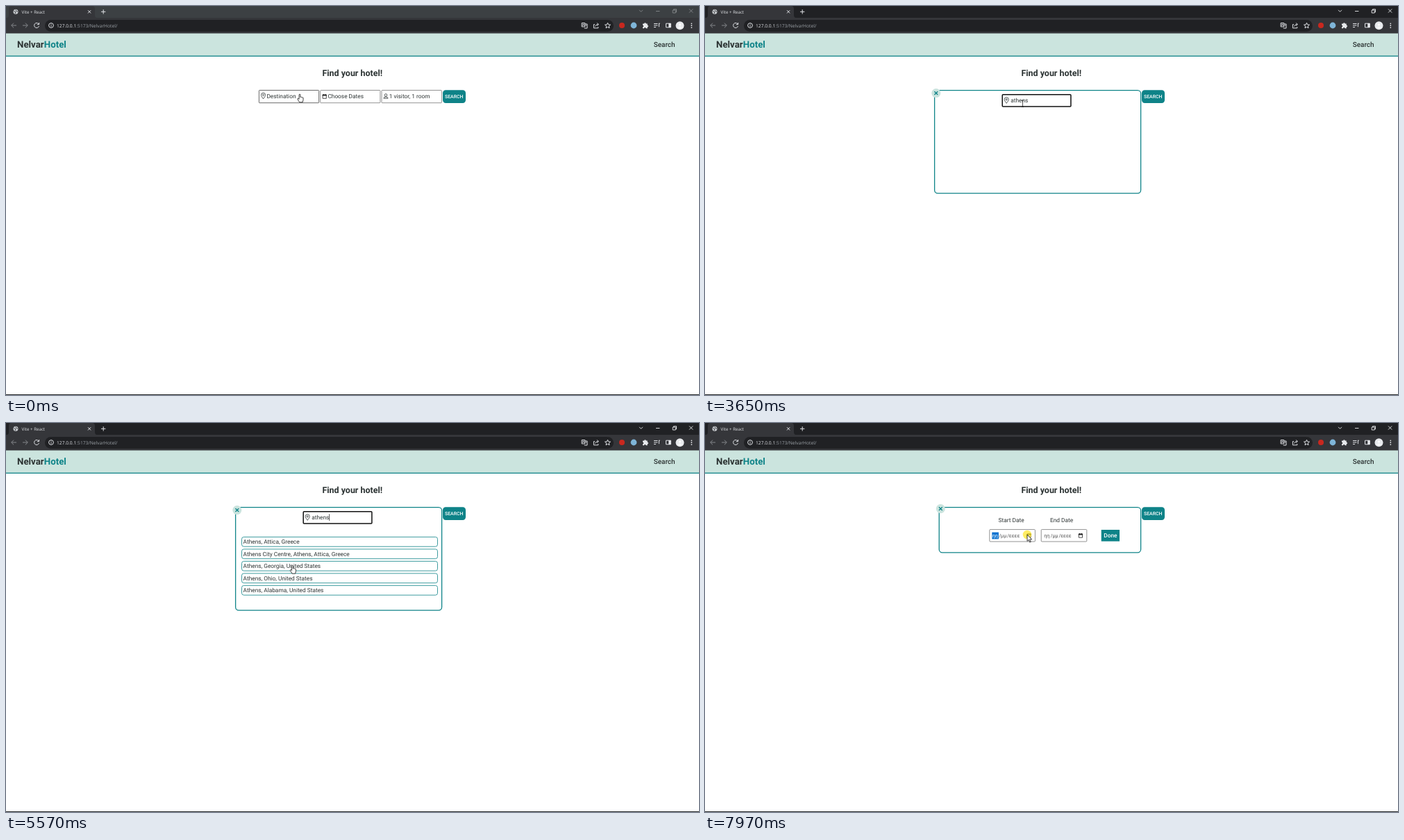
Recreate the animation shown at these times as an HTML page. Size 998 by 561 pixels, loop 8 s.

```html
<!DOCTYPE html>
<html lang="en">
<head>
<meta charset="utf-8">
<title>Hotel search</title>
<style>
  html, body { margin: 0; width: 100%; height: 100%; overflow: hidden; background: #fff; }
  svg { display: block; width: 100%; height: 100%; }
  text { font: 8.32px Roboto, sans-serif; fill: #2c3333; white-space: pre; text-rendering: geometricPrecision; }
  .ui { font-family: "Open Sans", sans-serif; fill: #dfe1e5; }
  .logo { font-size: 13.3px; font-weight: 700; }
  .title { font-size: 12.48px; font-weight: 700; }
  .nav { font-size: 9.98px; font-weight: 500; }
  .button { font-size: 6.93px; font-weight: 500; fill: #fff; }
  .done { font-weight: 500; fill: #fff; }
  .date { font-size: 7.2px; fill: #555; }
  .teal { fill: #0e8388; }
  .line { fill: none; stroke: #dfe1e5; stroke-width: 1; }
  .dim { stroke: #85888c; }
  .glyph { fill: none; stroke: #2c3333; stroke-width: .8; }
  .field { fill: #fff; stroke: #767676; stroke-width: .8; }
  .panel { fill: #fff; stroke: #0e8388; stroke-width: 1.3; }
  .option { fill: #fff; stroke: #0e8388; stroke-width: .8; }
  .cursor path { stroke: #111; stroke-width: .8; fill: #fff; stroke-linejoin: round; }
</style>
</head>
<body>
<svg viewBox="0 0 998 561" preserveAspectRatio="none">
  <defs>
    <clipPath id="fieldClip"><rect x="375" y="121" width="72" height="19"/></clipPath>
    <g id="pin"><path class="glyph" d="M0 4.3C-2 1.5-3.1.2-3.1-1.2a3.1 3.1 0 0 1 6.2 0C3.1.2 2 1.5 0 4.3Z"/><circle class="glyph" cy="-1.2" r="1.1"/></g>
    <g id="calendar"><path d="M-2.6-2.3h5.2v5.2h-5.2Z" fill="none" stroke="#222" stroke-width=".8"/><path d="M-3-2.6h6v1.8h-6ZM-2-3.4h.9v1h-.9ZM1.1-3.4H2v1h-.9Z" fill="#222"/></g>
    <g id="close"><circle r="6.5" fill="#cbe4de"/><path d="M-2.4-2.4 2.4 2.4M2.4-2.4-2.4 2.4" stroke="#0e8388" stroke-width="1.3"/></g>
  </defs>

  <!-- browser window -->
  <rect id="titleBar" width="998" height="18"/>
  <path d="M1 17Q4 17 4 13V4Q4 0 8 0H124Q128 0 128 4V13Q128 17 131 17Z" fill="#35363a"/>
  <rect y="17" width="998" height="23" fill="#35363a"/>
  <rect x="56" y="20" width="819" height="17" rx="8.5" fill="#202124"/>
  <circle cx="14" cy="8.3" r="3.5" fill="#c8cbcf"/>
  <path d="M11.4 7.2 14 8.6 13.2 11M14 5.4 15 7.4 17 8.2" fill="none" stroke="#45474a" stroke-width="1"/>
  <text class="ui" x="22.5" y="10.5" style="font-size:6.2px">Vite + React</text>
  <path class="line" d="M118 6.2l4.2 4.2m0-4.2-4.2 4.2M137 8.3h6.4M140.2 5.1v6.4"/>
  <g id="controls" fill="none" stroke-width=".9"><path d="M912 5.8l2.5 2.5L917 5.8M936 7.5h5.4M960.2 6h4v4h-4ZM961.4 6V4.7h4.1v4.1h-1.2M984 4.4l5.2 5.2m0-5.2-5.2 5.2"/></g>

  <path class="line dim" d="M15 28H7.8m3.3-3.4L7.7 28l3.4 3.4M24 28h7.2m-3.3-3.4 3.4 3.4-3.4 3.4"/>
  <path class="line" d="M46.8 25.7A3.5 3.5 0 1 0 47.5 29M47.6 24v2.7h-2.8" stroke-width="1.2"/>
  <circle class="line" cx="65" cy="28" r="3.4" stroke-width=".8"/>
  <path class="line" d="M65 27.6v2.2M65 25.9v.9"/>
  <text class="ui" x="73" y="30.6" style="font-size:6.7px">127.0.0.1<tspan fill="#9aa0a6">:5173/NelvarHotel/</tspan></text>
  <g class="line" stroke-width=".9">
    <path d="M829.2 24.5h4.6v5.4h-4.6ZM834 26h3v6h-4.2M830.4 28.4l1.1-2.6 1.1 2.6M834.6 28h1.6"/>
    <path d="M848 26.6h-1.6v5.2h6.4V30M848.6 29.5q.5-3 4.3-3M851.2 24.4l2.1 2.1-2.1 2.1"/>
    <path d="M866.5 24.2l1.1 2.7 2.9.2-2.2 1.9.7 2.8-2.5-1.5-2.5 1.5.7-2.8-2.2-1.9 2.9-.2Z"/>
    <path d="M933 25.5h5.5M933 28h5.5M933 30.5h3M940.4 25v5.2M940 25.2h1.8"/>
    <path d="M950.5 25.2h6.8v5.6h-6.8Z"/>
  </g>
  <circle cx="887" cy="28" r="4" fill="#c9281f"/>
  <circle cx="904" cy="28" r="4.4" fill="#7fb5d8"/>
  <g fill="#e8eaed">
    <path d="M917 25.6h2.1a1.3 1.3 0 0 1 2.6 0h2v2.1a1.3 1.3 0 0 1 0 2.6v2h-2.2a1.2 1.2 0 0 0-2.4 0H917v-2.2a1.2 1.2 0 0 0 0-2.4Z"/>
    <path d="M954.3 25h3v6h-3Z"/>
    <circle cx="970.5" cy="28.3" r="6"/>
    <circle cx="987.3" cy="25.3" r=".9"/><circle cx="987.3" cy="28.2" r=".9"/><circle cx="987.3" cy="31.1" r=".9"/>
  </g>
  <path d="M967 31.5q3.5-3.4 7 0ZM968.9 27a1.6 1.6 0 1 1 3.2 0 1.6 1.6 0 1 1-3.2 0Z" fill="#fff"/>

  <!-- page -->
  <rect y="39.5" width="998" height="32.5" fill="#cbe4de"/>
  <rect y="71.6" width="998" height="1.3" fill="#0e8388"/>
  <text class="logo" x="16" y="60.3">Nelvar<tspan class="teal">Hotel</tspan></text>
  <text class="nav" x="932.7" y="59">Search</text>
  <text class="title" x="455.4" y="101.4">Find your hotel!</text>
  <rect class="teal" x="629" y="121.3" width="33" height="18.6" rx="4.2"/>
  <text class="button" x="632" y="133.4">SEARCH</text>
  <rect y="560" width="998" height="1" fill="#25282a"/>

  <g id="form">
    <rect id="destField" class="field" x="364.4" y="121.5" width="86.2" height="18.2" rx=".8"/>
    <rect id="datesField" class="field" x="452.7" y="121.5" width="86.2" height="18.2" rx=".8"/>
    <rect class="field" x="541" y="121.5" width="86.4" height="18.2" rx=".8"/>
    <use href="#pin" x="370.5" y="129.6"/>
    <text id="destination" x="375.4" y="133.3" clip-path="url(#fieldClip)"></text>
    <use href="#calendar" x="458.7" y="130.4"/>
    <text x="463.4" y="133.3">Choose Dates</text>
    <circle class="glyph" cx="547" cy="128.5" r="1.8"/>
    <path class="glyph" d="M543.9 133.2q0-2.2 3.1-2.2t3.1 2.2Z"/>
    <text x="551.8" y="133.3">1 visitor, 1 room</text>
  </g>

  <g id="destPanel">
    <rect class="panel" x="330.6" y="121.7" width="297" height="148.4" rx="4.6"/>
    <use href="#close" x="332.8" y="125.6"/>
    <rect id="input" x="428.2" y="127.7" width="98.7" height="17.2" rx="1" fill="#fff"/>
    <use href="#pin" x="434.2" y="136"/>
    <text id="typed" x="440.2" y="139"></text>
    <rect id="caret" y="131.3" width=".7" height="9.7" fill="#111"/>
    <g id="list"></g>
  </g>

  <g id="datePanel">
    <rect class="panel" x="337.2" y="121.7" width="290.4" height="65.2" rx="4.6"/>
    <use href="#close" x="339.3" y="123.6"/>
    <text x="422.6" y="143">Start Date</text>
    <text x="497" y="143">End Date</text>
    <g id="dates"></g>
    <rect class="teal" x="570.7" y="154" width="26.3" height="16.6"/>
    <text class="done" x="574.3" y="165">Done</text>
  </g>

  <g id="pointer" class="cursor">
    <circle id="press" r="6.3" fill="#ffe629" opacity=".72"/>
    <path id="arrow" d="M0 0V9.4L2.2 7.4 3.7 11 5.2 10.4 3.7 6.9H6.7Z"/>
    <path id="hand" d="M-.9 6V.6Q-.9-.3 0-.3T.9.6V4Q1.7 3.3 2.3 4.1 3.1 3.5 3.7 4.4 5 4 5 5.4V8L4.2 11.3H-.4L-2.7 7.6Q-3.5 6.2-2.6 5.7-1.8 5.4-.9 6.8Z"/>
    <path id="beam" d="M-1.5-4.6H-.5L0-4.2.5-4.6H1.5M0-4.2V4.2M-1.5 4.6H-.5L0 4.2.5 4.6H1.5" style="fill:none;stroke-width:.7"/>
  </g>
</svg>
<script>
const LOOP = 8000, BLINK = 545;
const el = Object.fromEntries([...document.querySelectorAll('[id]')].map(e => [e.id, e]));
const show = (node, on) => node.setAttribute('visibility', on ? 'visible' : 'hidden');
const within = (t, a, b) => t >= a && t < b;

// time, x, y of the hot spot, shape until the next row
const PATH = [
  [0, 423, 127.5, 'hand'], [920, 423, 128, 'arrow'], [1250, 423, 128, 'arrow'],
  [1380, 438, 135, 'beam'], [1600, 457.5, 141, 'beam'], [3780, 457.5, 141, 'beam'],
  [3900, 450, 150, 'arrow'], [4010, 443, 165, 'hand'], [4410, 420, 239, 'hand'],
  [4450, 420, 239, 'hand'], [4680, 394.5, 172, 'hand'], [4950, 394.5, 172, 'hand'],
  [5290, 420, 238, 'hand'], [5500, 416, 214.5, 'hand'], [5570, 412.5, 206, 'hand'],
  [5780, 402, 178, 'hand'], [5990, 398, 172.5, 'hand'], [6480, 398, 172.5, 'arrow'],
  [6610, 398, 172.5, 'arrow'], [6890, 497.5, 140.5, 'arrow'], [6970, 500, 134, 'hand'],
  [7230, 500, 133, 'arrow'], [7360, 500, 133, 'arrow'], [7700, 490, 158, 'arrow'],
  [7900, 464, 161, 'arrow'], [LOOP, 464, 161, 'arrow']
];
const PRESSES = [[790, 920], [1540, 1670], [6410, 6480], [7100, 7230], [7970, LOOP]];
const KEYS = [2460, 2590, 2790, 2860, 2990, 3120];
const PLACES = ['Athens, Attica, Greece', 'Athens City Centre, Athens, Attica, Greece',
  'Athens, Georgia, United States', 'Athens, Ohio, United States', 'Athens, Alabama, United States'];
const TOP = 164, PITCH = 17.5, ROW = 13.8;

el.list.innerHTML = PLACES.map((place, i) => `
  <rect class="option" x="339.5" y="${TOP + .4 + i * PITCH}" width="282" height="${ROW}" rx="3"/>
  <text x="341.6" y="${TOP + 10 + i * PITCH}">${place}</text>`).join('');
const options = [...el.list.querySelectorAll('rect')];

el.dates.innerHTML = [409.8, 484.2].map((x, i) => `
  <rect class="field" x="${x}" y="153.6" width="65.6" height="17.4" rx="1"/>
  ${i ? '' : '<rect id="selection" x="413.3" y="157.6" width="9.6" height="9.8" fill="#0b72d0"/>'}
  <text class="date" y="165.2"><tspan x="${x + 4}">ηη</tspan><tspan x="${x + 13.4}">/</tspan><tspan
    x="${x + 16.3}">μμ</tspan><tspan x="${x + 25.2}">/</tspan><tspan x="${x + 28}">εεεε</tspan></text>
  <use href="#calendar" x="${x + 56.7}" y="162.3"/>`).join('');
const selection = document.getElementById('selection');
const startDay = el.dates.querySelector('tspan');
const endField = el.dates.querySelectorAll('.field')[1];

function pointerAt(t) {
  const i = Math.max(0, PATH.findIndex(row => row[0] > t) - 1);
  const [t0, x0, y0, shape] = PATH[i], [t1, x1, y1] = PATH[i + 1];
  const k = (t - t0) / (t1 - t0);
  return { x: x0 + (x1 - x0) * k, y: y0 + (y1 - y0) * k, shape };
}

function drawWindow(t) {
  const active = t >= 70;
  el.titleBar.setAttribute('fill', active ? '#202124' : '#3c4043');
  el.controls.setAttribute('stroke', active ? '#e8eaed' : '#85888c');
}

function drawDestination(t) {
  const focused = t >= 1570;
  const count = KEYS.filter(key => t >= key).length;
  el.input.setAttribute('stroke', focused ? '#101010' : '#767676');
  el.input.setAttribute('stroke-width', focused ? 1.5 : .8);
  el.typed.textContent = count ? 'athens'.slice(0, count) : 'Enter destination';
  el.typed.style.fill = count ? '#2c3333' : '#757575';
  const caretStart = count === 6 ? 3105 : count ? KEYS[count - 1] : 1585;
  const lit = Math.floor((t - caretStart) / BLINK) % 2 === 0;
  show(el.caret, within(t, 1585, 6480) && lit);
  el.caret.setAttribute('x', count ? 440.3 + el.typed.getComputedTextLength() : 440.2);

  // highlight trails the pointer slightly
  const listed = within(t, 3780, 6480);
  const offset = pointerAt(Math.max(0, t - 70)).y - TOP;
  const hovered = offset >= 0 && offset % PITCH < 14.6 ? Math.floor(offset / PITCH) : -1;
  show(el.list, listed);
  options.forEach((option, i) => option.style.fill = i === hovered ? '#e7f2f2' : '#fff');
}

function drawDates(t) {
  const chosen = t >= 7970;
  show(selection, chosen);
  startDay.style.fill = chosen ? '#fff' : '#555';
  endField.style.stroke = within(t, 7640, 7750) ? '#444' : '#767676';
}

function drawPointer(t) {
  const p = pointerAt(t);
  el.pointer.setAttribute('transform', `translate(${p.x} ${p.y})`);
  for (const shape of ['arrow', 'hand', 'beam']) show(el[shape], shape === p.shape);
  show(el.press, PRESSES.some(([a, b]) => within(t, a, b)));
}

function draw(t) {
  const panel = within(t, 920, 6480) ? 'destPanel' : t >= 7230 ? 'datePanel' : 'form';
  for (const id of ['form', 'destPanel', 'datePanel']) el[id].style.display = id === panel ? '' : 'none';
  el.destination.textContent = t >= 6480 ? 'Athens, Attica, Greece' : 'Destination';
  el.destField.style.stroke = t < 920 ? '#444' : '#767676';
  el.datesField.style.stroke = within(t, 6970, 7230) ? '#444' : '#767676';
  drawWindow(t);
  if (panel === 'destPanel') drawDestination(t);
  else { show(el.caret, false); show(el.list, false); }
  if (panel === 'datePanel') drawDates(t);
  drawPointer(t);
}

const start = performance.now();
function tick() {
  draw((performance.now() - start) % LOOP);
  requestAnimationFrame(tick);
}
tick();
</script>
</body>
</html>
```
